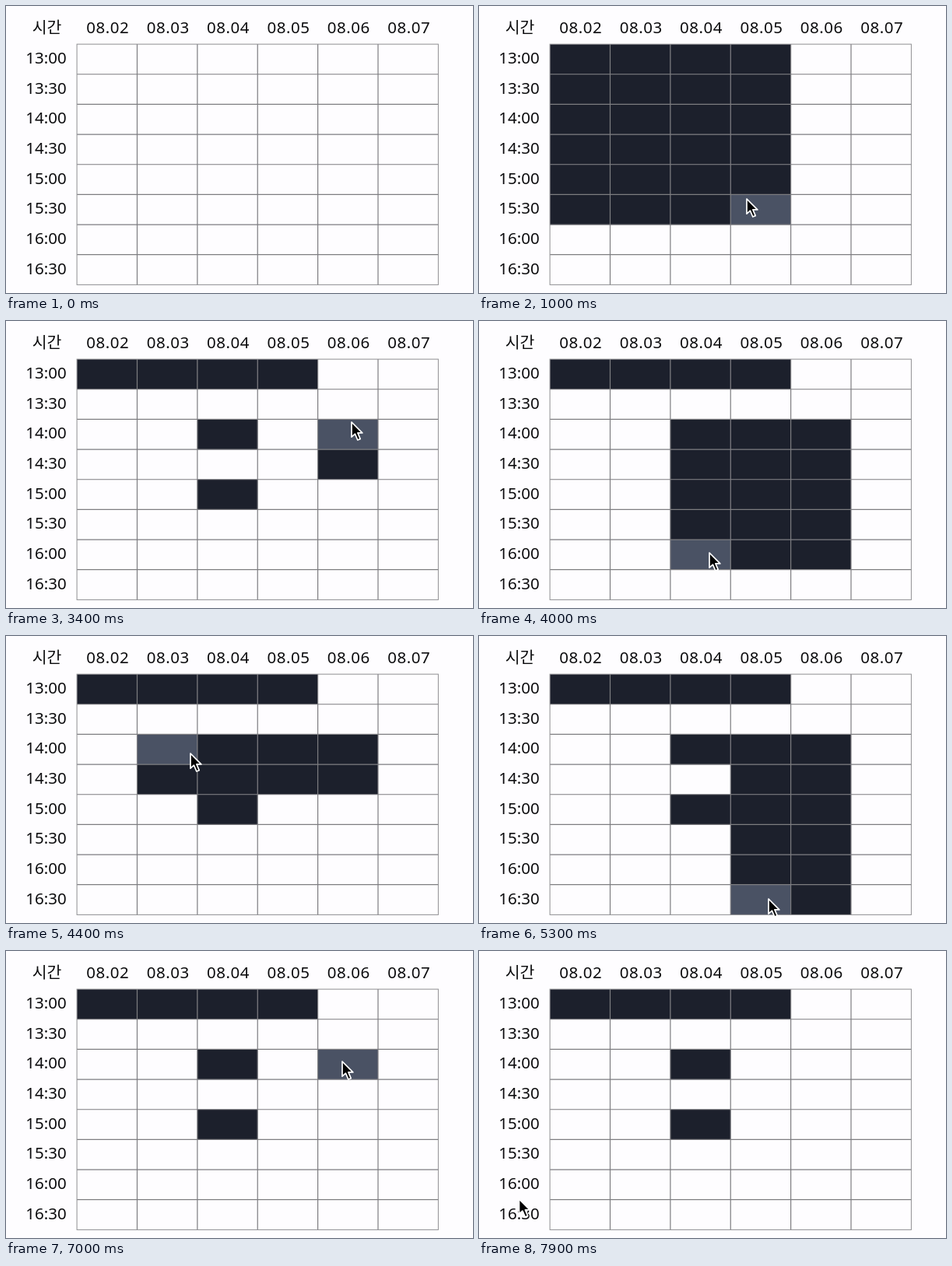
These frames come from a looping animation (600x369 px, 9.3 s). An HTML page:

```html
<!DOCTYPE html>
<html lang="ko">
<head>
<meta charset="utf-8">
<title>시간표</title>
<style>
  html, body { margin: 0; width: 100%; height: 100%; overflow: hidden; background: #fefdff; }
  svg { display: block; width: 100%; height: 100%; }
  text { font: 500 20.5px "Noto Sans", "Noto Sans CJK KR", "Noto Sans CJK", sans-serif; fill: #0c0c0e; text-anchor: middle; }
  .day { letter-spacing: .5px; }
  .inner { stroke: #7d7d80; stroke-width: 1.2; }
  .outer { fill: none; stroke: #8e8e91; stroke-width: 1; }
  #cursor { fill: #000; stroke: #fff; stroke-width: 1.7; stroke-linejoin: round; }
</style>
</head>
<body>
<svg id="stage" viewBox="0 0 600 369">
  <g id="cells"></g>
  <g id="lines"></g>
  <g id="labels"></g>
  <path id="cursor" d="M0 0V19.2L4.4 15.2L7.8 23L11.2 21.6L7.9 13.9H13.8Z"/>
</svg>
<script>
const LOOP = 9300, STEP = 100, LAG = 50;
const COLS = 6, ROWS = 8, LEFT = 91.1, TOP = 49.1, W = 77.38, H = 38.66;
const EMPTY = "none", CHOSEN = "#1c202c", HOVER = "#4a5264";

// Each move glides through its points, evenly spaced in time
const origin = [130, 66];
const moves = [
  { from: 200, to: 950, via: [[344, 248]] },
  { from: 1350, to: 2300, via: [[140, 105], [286, 158]] },
  { from: 2400, to: 3400, via: [[286, 215], [300, 222], [440, 185], [444, 130]] },
  { from: 3400, to: 3800, via: [[296, 298]] },
  { from: 4000, to: 5000, via: [[125, 290], [237, 151], [390, 145], [436, 230], [436, 332]] },
  { from: 5100, to: 5300, via: [[372, 338]] },
  { from: 5500, to: 7000, via: [[295, 310], [300, 190], [396, 174], [440, 148], [432, 142]] },
  { from: 7200, to: 7300, via: [[390, 190]] },
  { from: 7500, to: 7900, via: [[51.5, 319]] }
];

// Button down and up times; equal times are a click
const presses = [[200, 1000], [1400, 1850], [2400, 2400], [2800, 2800], [3200, 3200], [3500, 5400], [5600, 7000]];

const $ = id => document.getElementById(id);

function add(parent, tag, attrs, text) {
  const el = document.createElementNS("http://www.w3.org/2000/svg", tag);
  for (const key in attrs) el.setAttribute(key, attrs[key]);
  if (text) el.textContent = text;
  return $(parent).appendChild(el);
}

const cells = Array.from({ length: COLS * ROWS }, (_, i) => add("cells", "rect", {
  x: LEFT + i % COLS * W, y: TOP + Math.floor(i / COLS) * H, width: W, height: H
}));

const right = LEFT + COLS * W, bottom = TOP + ROWS * H;
for (let i = 1; i < COLS; i++) {
  const x = LEFT + i * W;
  add("lines", "line", { class: "inner", x1: x, x2: x, y1: TOP, y2: bottom });
}
for (let i = 1; i < ROWS; i++) {
  const y = TOP + i * H;
  add("lines", "line", { class: "inner", x1: LEFT, x2: right, y1: y, y2: y });
}
add("lines", "rect", { class: "outer", x: LEFT, y: TOP, width: COLS * W, height: ROWS * H });

add("labels", "text", { x: 52.5, y: 35 }, "시간");
for (let i = 0; i < COLS; i++) {
  add("labels", "text", { class: "day", x: 130.8 + i * W, y: 35.2 }, "08.0" + (i + 2));
}
for (let i = 0; i < ROWS; i++) {
  const time = 13 + (i >> 1) + (i % 2 ? ":30" : ":00");
  add("labels", "text", { x: 51.5, y: 73.9 + i * 38.7 }, time);
}

// Catmull-Rom curve through points, u in 0..1
function spline(points, u) {
  const last = points.length - 1;
  const i = Math.min(Math.floor(u * last), last - 1), s = u * last - i;
  const at = k => points[Math.max(0, Math.min(last, k))];
  return [0, 1].map(axis => {
    const [a, b, c, d] = [-1, 0, 1, 2].map(k => at(i + k)[axis]);
    return b + s / 2 * (c - a + s * (2 * a - 5 * b + 4 * c - d + s * (3 * (b - c) + d - a)));
  });
}

function pointerAt(t) {
  let pos = origin;
  for (const { from, to, via } of moves) {
    if (t <= from) break;
    if (t < to) return spline([pos, ...via], (t - from) / (to - from));
    pos = via[via.length - 1];
  }
  return pos;
}

function cellAt([x, y]) {
  return [Math.floor((x - LEFT) / W), Math.floor((y - TOP) / H)];
}

const between = (v, a, b) => v >= Math.min(a, b) && v <= Math.max(a, b);

// A press sets the block from its first cell to the opposite of that cell's state
function chosenAt(t) {
  const chosen = new Array(COLS * ROWS).fill(false);
  for (const [down, up] of presses) {
    if (t < down) break;
    const [col0, row0] = cellAt(pointerAt(down - LAG));
    const [col1, row1] = cellAt(pointerAt(Math.min(t, up) - LAG));
    const value = !chosen[row0 * COLS + col0];
    chosen.forEach((_, i) => {
      if (between(i % COLS, col0, col1) && between(Math.floor(i / COLS), row0, row1)) chosen[i] = value;
    });
  }
  return chosen;
}

function draw(now) {
  const t = Math.floor(now % LOOP / STEP) * STEP;
  const shown = t >= moves[0].from;
  const pos = pointerAt(t);
  const [col, row] = cellAt(pos);
  const chosen = chosenAt(t);
  cells.forEach((cell, i) => {
    const hover = shown && i % COLS === col && Math.floor(i / COLS) === row;
    cell.setAttribute("fill", hover ? HOVER : chosen[i] ? CHOSEN : EMPTY);
  });
  $("cursor").setAttribute("visibility", shown ? "visible" : "hidden");
  $("cursor").setAttribute("transform", `translate(${pos})`);
}

const begin = performance.now();
function tick() {
  draw(performance.now() - begin);
  requestAnimationFrame(tick);
}
tick();
</script>
</body>
</html>
```
